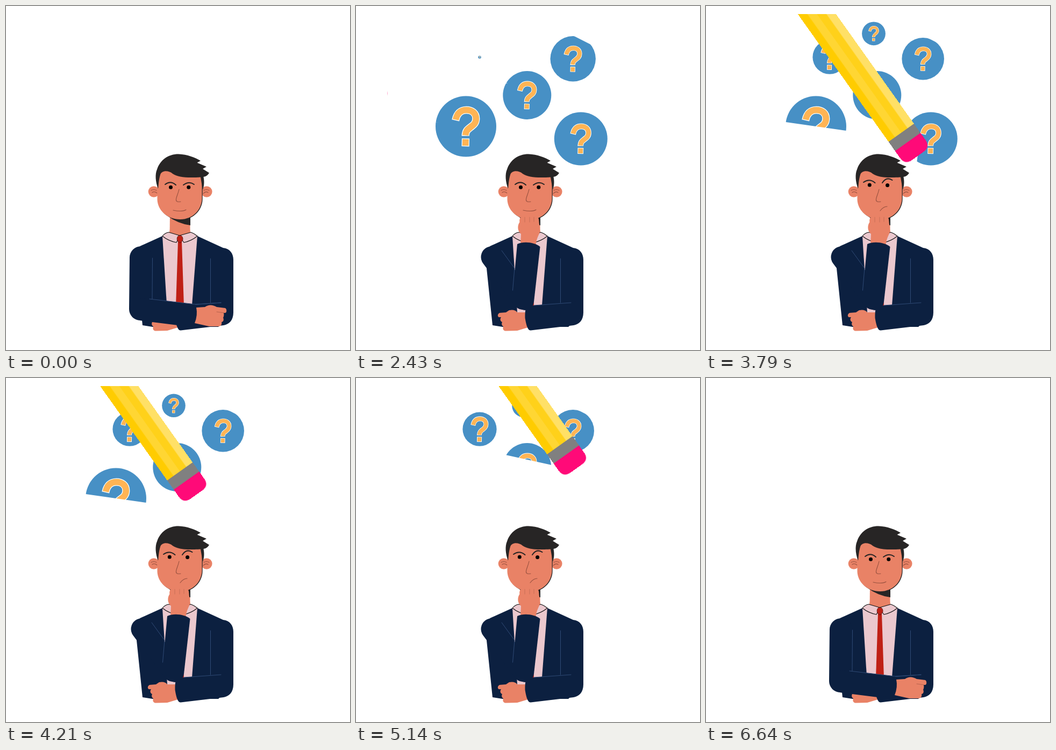
An HTML page for the animation above (8000 ms loop, 640 px wide and 640 px high).

```html
<!DOCTYPE html>
<html lang="en">
<head>
<meta charset="utf-8">
<title>Questions</title>
<style>
  html, body { margin: 0; width: 100%; height: 100%; overflow: hidden; background: #fff; }
  svg { display: block; width: 100%; height: 100%; }
  .navy { fill: #0c2040; }
  .skin { fill: #e98266; }
  .hair { fill: #272525; }
  .shirt { fill: #ebc8ce; }
  .tie { fill: #bf2015; }
  .line { fill: none; stroke-linecap: round; }
  .seam { stroke: #2f4a75; stroke-width: 1; }
  .crease { stroke: #96503f; stroke-width: 1.1; }
  .brow { stroke: #272525; stroke-width: 2; }
  .upper { fill: none; stroke: #0c2040; stroke-linecap: round; }
  .bubble circle { fill: #4790c5; }
  .mark { fill: none; stroke: #ffb454; stroke-width: 11.6; }
  .rim { stroke: #fff; stroke-width: 14.2; }
</style>
</head>
<body>
<svg viewBox="0 0 640 640">
  <defs>
    <mask id="unerased" maskUnits="userSpaceOnUse" x="0" y="0" width="640" height="640">
      <path id="rub" fill="none" stroke="#fff" stroke-width="60" stroke-linejoin="round"
        d="M40,180 L130,244 L474,287 V232 L130,183 L449,164 V150 L186,92 V64 L442,108 L312,42 L240,8"/>
    </mask>
    <clipPath id="panel"><rect x="58.500" y="15.500" width="524" height="600" rx="42"/></clipPath>
    <path id="face" d="M281.500,318 V360 C282,380 300,397 324,397 C348,397 364.500,378 364.500,358 V312 C340,300 300,300 284,308Z"/>
  </defs>

  <g id="man">
    <path class="skin" d="M305,385 H342.500 V432 H304.500Z"/>
    <path class="hair" d="M301,391 Q320,400 343,393 V408 Q320,405 301,391Z"/>
    <path class="navy" d="M291,428 L249,447 L243,488 L254,594 L273,597 H395 L423,570 V472 C423,460 416,451 404,450 L356,428Z"/>
    <path class="shirt" d="M291,428 L300,570 H345 L356,428 L323,424Z"/>
    <path class="tie" d="M320,438 H327 L331,558 H316Z"/>
    <path class="skin" d="M305,415 H342 L343,421 L323,427 L304,421Z"/>
    <path class="shirt" stroke="#111" stroke-width="1.100" stroke-linejoin="round"
      d="M291,428 Q296,422 303,421 L323,427 L344,421 Q350,423 356,428 Q345,437 331,440 L323,429 L317,440 Q302,437 291,428Z"/>
    <path class="tie" stroke="#4a0d0b" stroke-width=".8" d="M323.500,427 C328,427 330,432 328.500,436 L324,441 L319,437 C317,432 319,427 323.500,427Z"/>

    <circle class="skin" cx="275" cy="345.500" r="10.300"/>
    <circle class="skin" cx="373.300" cy="345.500" r="10.300"/>
    <path class="line crease" d="M270,343 Q275,340 280,343 M272,347 Q276,344 281,348 M378,343 Q373,340 368,343 M376,347 Q371,344 367,349"/>
    <use href="#face" class="hair" x="1.200" y=".8"/>
    <use href="#face" class="skin"/>
    <path class="hair" d="M283,340 C278,327 277,313 281,304 C287,286 302,275.500 321,275.500 C337,276 352,282 362,288 L355.500,291.500 L373,299 L366,303 L378,310.500 C375,316 371,317 367.500,318 C369,326 369,334 366,342 L362,318.500 C338,320 320,319 310,312 C302,305 289,306 287,314 C284,324 284,332 283,340Z"/>
    <path class="line crease" d="M322,341 C320,350 316.500,356 316.500,360 Q316,365.500 325,364"/>
    <path id="mouth" class="line crease"/>
    <path id="browL" class="line brow"/>
    <path id="browR" class="line brow"/>
    <circle id="eyeL" r="3.500"/>
    <circle id="eyeR" r="3.500"/>

    <path class="skin" d="M320,570 H300 Q296,564 285,566 L279,570 L267,571 C263,573 263,578 266,579 H270 C267,583 269,587 272,588 C270,592 272,595 274,596 C272,602 275,605 280,604.500 L300,604 L320,598Z"/>
    <path class="navy" d="M317,559 L331,557 L400,552 L423,545 V570 C423,585 415,592 405,594 L325,603.500 C319,604 316,590 314.500,580 Q314,568 317,559Z"/>
    <path class="line seam" d="M380.500,470 V552 M331,557 L400,552"/>

    <g id="crossed">
      <path class="upper" stroke-width="42" d="M251,468 L250,564"/>
      <path class="navy" d="M249,544 L267,545 L352,555 C357,566 357,580 352,590 L320,594 L249,585Z"/>
      <path class="skin" d="M354,561 L370,560 Q380,553 392,560 L408,562 C411,564 411,570 408,571 H405 C406,575 405,578 404,580 C406,584 404,588 401,588 C402,592 400,596 396,596 H378 L351,590 Q357,575 354,561Z"/>
      <path class="line crease" stroke-opacity=".6" d="M392,569 L406,571"/>
      <path class="line seam" d="M272.500,469 L272,545 M267,545 L352,555 L400,552"/>
    </g>
    <g id="thinking">
      <path class="skin" d="M306,446 L307,424 C300,419 300,408 304.500,402 C303,395 308,391 314,392 H337 C341,395 340,400 341,407 L341.500,422 C338,430 335,436 334.500,446Z"/>
      <path class="line crease" stroke-opacity=".35" d="M314,393 V402 M323,393 V402 M331,393 V401"/>
      <path class="upper" stroke-width="40" d="M252.500,467 L311,545"/>
      <path class="navy" d="M300,443 C313,437 333,440 342.500,448 L331,550 C329,563 322,566 315,566 C302,566 294,550 292,529Z"/>
      <path class="line seam" d="M271,455 L295,488 L291.500,529"/>
    </g>
  </g>

  <g id="bubbles" mask="url(#unerased)"></g>

  <g clip-path="url(#panel)">
    <g id="pencil">
      <path fill="#fc0" d="M-29,-52 V-600 H29 V-52Z"/>
      <path fill="#ffd633" d="M-14.500,-52 V-600 H29 V-52Z"/>
      <path fill="#ffd11a" d="M0,-52 V-600 H29 V-52Z"/>
      <path fill="#ffe066" d="M14.500,-52 V-600 H29 V-52Z"/>
      <path fill="#808080" d="M-29,-53 H29 V-32 H-29Z"/>
      <path fill="#ff0a78" d="M-29,-32 H29 V-16 Q29,0 13,0 H-13 Q-29,0 -29,-16Z"/>
    </g>
  </g>
</svg>
<script>
const LOOP = 8000, STEP = 500 / 7, THINK = 500, END = 6640;
const $ = id => document.getElementById(id);
const clamp = x => Math.min(1, Math.max(0, x));
const smooth = x => x * x * (3 - 2 * x);
const mix = (a, b, k) => a.map((v, i) => v + (b[i] - v) * k);

// Question mark, 74 units high; the rim runs a little past both ends.
const hook = 'L-19,-12.5 C-16.5,-24 -10,-30.5 1,-30.5 C11,-30.5 18.8,-24.5 18.8,-14.5 C18.8,-5 13,-2 8,2 C2,6.500 -.3,9 -.8,16.500';
const dot = 'M-.5,23.700 L-.9,35.900';
const mark = `<path class="mark rim" d="M-19.300,-11.200 ${hook} V17.800 M-.5,22.400 L-.9,37.200"/>
  <path class="mark" d="M-19,-12.500 ${hook} ${dot}"/>`;

// x, y, radius, height of the mark, start
const bubbles = [
  [204.5, 224, 56.5, 74, 600],
  [418.3, 247, 49.5, 56, 1050],
  [318.3, 166, 45, 52, 1500],
  [403.7, 98.3, 39.3, 45, 1950],
  [230, 95.2, 31.6, 47, 2400],
  [312, 51.3, 21.8, 28, 2970]
].map(([x, y, r, h, start]) => {
  $('bubbles').insertAdjacentHTML('beforeend',
    `<g class="bubble"><circle r="${r}"/><g transform="scale(${h / 74})">${mark}</g></g>`);
  return { x, y, start, node: $('bubbles').lastElementChild };
});

// calm and doubtful coordinates
const curves = {
  mouth: [[311, 380, 328, 383.5, 335, 379], [324, 381, 330, 373, 337, 373]],
  browL: [[296, 332, 306, 324, 316, 333], [293, 328, 304, 320, 314.5, 329]],
  browR: [[330, 333, 341, 325, 350, 332], [328, 329, 336, 317, 346.5, 324]]
};
const eyes = {
  eyeL: [[306.5, 337.3], [304.3, 333]],
  eyeR: [[339.8, 337.3], [337.6, 333.4]]
};

// time and distance along the rubbing path
const rub = $('rub'), rubLength = rub.getTotalLength();
const ENTER = 2400;
const sweep = [[3785, 376], [4640, 888], [5710, 1424], [6430, 1802], [END, 1907]];

function travelled(t) {
  const [first, reach] = sweep[0];
  if (t < first) return reach * clamp((t - ENTER) / (first - ENTER)) ** 2;
  const i = Math.max(1, sweep.findIndex(([time]) => time >= t));
  const [t0, s0] = sweep[i - 1], [t1, s1] = sweep[i];
  return s0 + (s1 - s0) * (t - t0) / (t1 - t0);
}

function pop(t) {
  if (t <= 0) return 0;
  if (t < 570) return 1.11 * Math.sin(t / 570 * Math.PI / 2);
  return 1.11 - .11 * smooth(clamp((t - 570) / 280));
}

function show(id, on) {
  $(id).setAttribute('display', on ? 'inline' : 'none');
}

function draw(t) {
  const active = t >= THINK && t < END;
  show('crossed', !active);
  show('thinking', active);
  show('bubbles', active);
  show('pencil', active && t > ENTER);

  const doubt = active ? smooth(clamp((t - 2850) / 350)) : 0;
  for (const id in curves) {
    const [a, b, c, d, e, f] = mix(...curves[id], doubt);
    $(id).setAttribute('d', `M${a},${b} Q${c},${d} ${e},${f}`);
  }
  for (const id in eyes) {
    const [x, y] = mix(...eyes[id], doubt);
    $(id).setAttribute('cx', x);
    $(id).setAttribute('cy', y);
  }
  if (!active) return;

  for (const b of bubbles) {
    b.node.setAttribute('transform', `translate(${b.x} ${b.y}) scale(${pop(t - b.start)})`);
  }
  const s = travelled(t), tip = rub.getPointAtLength(s);
  const lead = 28 * clamp((t - 5000) / 500);
  rub.setAttribute('stroke-dasharray', `0 ${s + lead} ${rubLength}`);
  $('pencil').setAttribute('transform', `translate(${tip.x} ${tip.y + 2}) rotate(-35.4)`);
}

const begin = performance.now();
function tick() {
  const t = (performance.now() - begin) % LOOP;
  draw(Math.floor((t + 5) / STEP) * STEP);
  requestAnimationFrame(tick);
}
tick();
</script>
</body>
</html>
```
